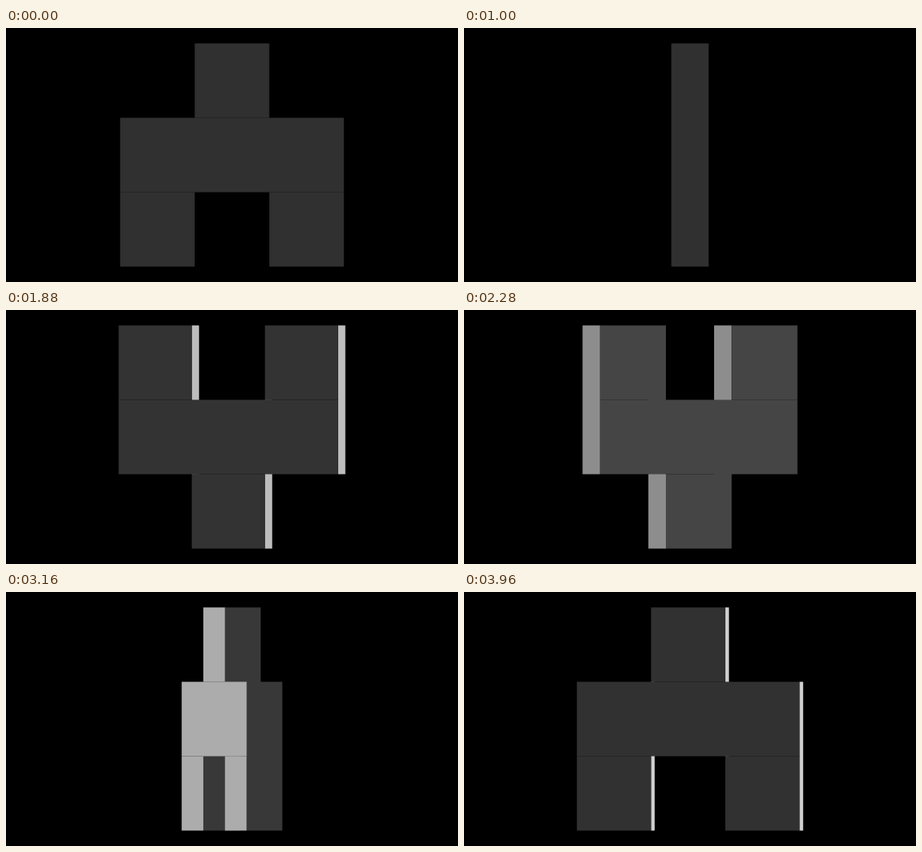
Write an HTML page with a canvas that moves like this. It is 600 px wide and 338 px high and loops after 4000 ms.

```html
<!DOCTYPE html>
<html lang="en">
<head>
<meta charset="utf-8">
<title>Turning block</title>
<style>
  html, body { margin: 0; width: 100%; height: 100%; overflow: hidden; background: #000; }
  canvas { display: block; }
</style>
</head>
<body>
<canvas id="stage" width="600" height="338"></canvas>
<script>
const ctx = document.getElementById('stage').getContext('2d');

const LOOP = 4000;
const POSES = 64;
const LEAD = 38; // ms by which each pose comes early
const UNIT = 99;
const DEPTH = UNIT / 2;
const CX = 300;
const TOP = 20.5;

// Filled columns of each row, from top to bottom
const UPRIGHT = [[1], [0, 1, 2], [0, 2]];
const INVERTED = [...UPRIGHT].reverse();

// Surfaces grow brighter as they turn away; facing is the cosine to the viewer
function shade(facing) {
  const v = Math.round(48 + 175 * (1 - facing));
  return `rgb(${v},${v},${v})`;
}

function fillCells(rows, x0, step, width, color) {
  ctx.beginPath();
  rows.forEach((cols, r) => {
    for (const c of cols) ctx.rect(x0 + c * step, TOP + r * UNIT, width, UNIT);
  });
  ctx.fillStyle = color;
  ctx.fill();
}

function fillFace(rows, x0, w, color) {
  ctx.fillStyle = color;
  rows.forEach((cols, r) => {
    // Neighbouring cells are joined so that no seam shows
    let i = 0;
    while (i < cols.length) {
      let n = 1;
      while (cols[i + n] === cols[i] + n) n++;
      ctx.fillRect(x0 + cols[i] * w, TOP + r * UNIT, n * w, UNIT);
      i += n;
    }
  });
}

function draw(time) {
  const pose = Math.floor((time % LOOP + LEAD) / (LOOP / POSES)) % POSES;
  const angle = pose / POSES * Math.PI * 2;
  const cos = Math.cos(angle);
  const sin = Math.sin(angle);
  const facing = Math.abs(cos);
  const turned = Math.abs(sin);
  const rows = cos < -1e-6 ? INVERTED : UPRIGHT;
  const w = UNIT * facing;
  const side = DEPTH * turned;
  const sideOnLeft = sin * cos > 0;
  const left = CX - (3 * w + side) / 2;
  const faceX = sideOnLeft ? left + side : left;

  ctx.fillStyle = '#000';
  ctx.fillRect(0, 0, 600, 338);
  if (side > 0.01) {
    fillCells(rows, sideOnLeft ? left : left + w, w, side, shade(turned));
  }
  if (w > 0.01) fillFace(rows, faceX, w, shade(facing));
}

const start = performance.now();
function tick() {
  draw(performance.now() - start);
  requestAnimationFrame(tick);
}
tick();
</script>
</body>
</html>
```
